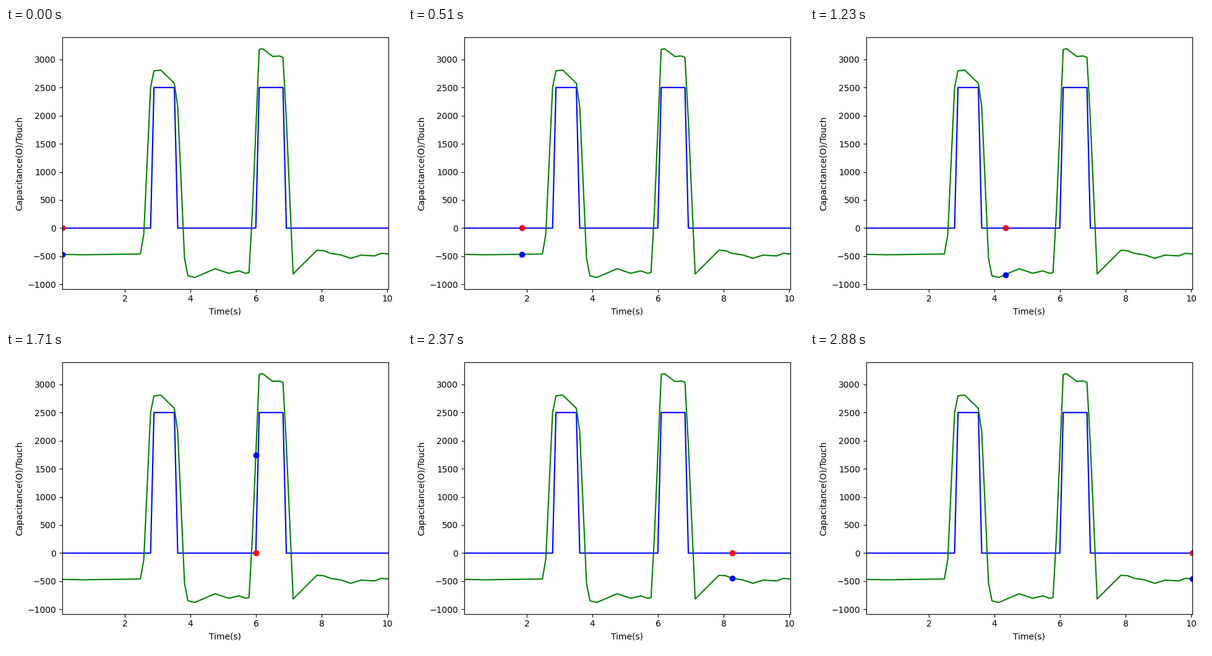
Recreate the animation shown at these times as a matplotlib script. Size 640x480 px, loop 2.91 s.

```python
import numpy as np
import matplotlib.pyplot as plt
from matplotlib.animation import FuncAnimation

N = 97
PRESSES = [(27, 33), (58, 65)]  # first and last touched sample
HIGH = 2500

# Turning points of the sensor signal: (sample, reading)
IDLE = [(0, -467), (6, -474), (23, -460), (24, -110)]
PRESS_1 = [(26, 2500), (27, 2797), (29, 2810), (33, 2575), (34, 2160)]
REST_1 = [(36, -535), (37, -847), (39, -878), (45, -722), (49, -803),
          (52, -760), (54, -803), (55, -790)]
PRESS_2 = [(56, 300), (58, 3177), (59, 3190), (62, 3053), (64, 3060),
           (65, 3036), (66, 1920)]
REST_2 = [(68, -815), (75, -394), (77, -402), (79, -449), (82, -476),
          (85, -537), (88, -480), (92, -494), (94, -448), (96, -459)]

idx = np.arange(N)
t = np.linspace(0.096, 10.03, N)
touch = sum(HIGH * ((idx >= a) & (idx <= b)) for a, b in PRESSES)
cap = np.interp(idx, *zip(*(IDLE + PRESS_1 + REST_1 + PRESS_2 + REST_2)))

fig, ax = plt.subplots(figsize=(6.4, 4.8), dpi=100)
ax.plot(t, touch, "b")
ax.plot(t, cap, "g")
touch_dot, = ax.plot([], [], "ro")
cap_dot, = ax.plot([], [], "bo")
ax.set_xlim(t[0], t[-1])
margin = 0.05 * np.ptp(cap)
ax.set_ylim(cap.min() - margin, cap.max() + margin)
ax.set_xlabel("Time(s)")
ax.set_ylabel("Capacitance(O)/Touch")
fig.tight_layout()


def update(i):
    for dot, signal in ((touch_dot, touch), (cap_dot, cap)):
        dot.set_data([t[i]], [signal[i]])
    return touch_dot, cap_dot


anim = FuncAnimation(fig, update, frames=N, interval=30, repeat=True,
                     repeat_delay=0)
plt.show()
```
